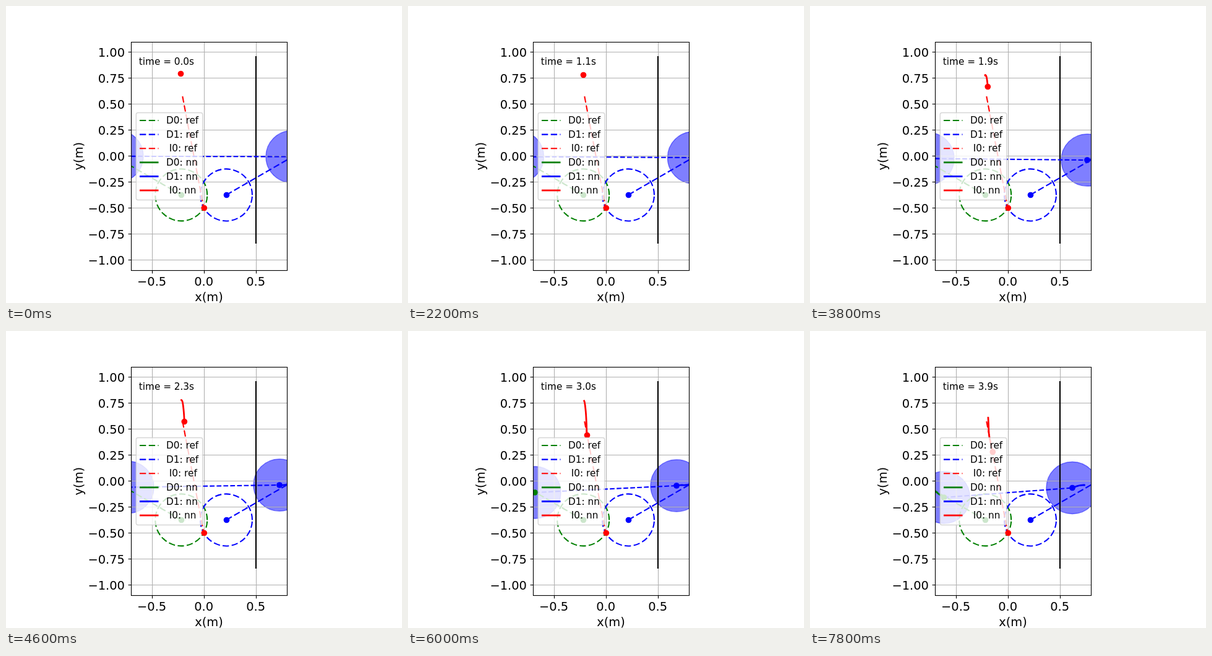
Animation, 640 px wide and 480 px high, one loop 8000 ms. Source, as an HTML page:

```html
<!DOCTYPE html>
<html lang="en">
<head>
<meta charset="utf-8">
<title>Trajectories</title>
<style>
  html, body { margin: 0; width: 100%; height: 100%; overflow: hidden; background: #fff; }
  svg { display: block; width: 640px; height: 480px; font-family: "DejaVu Sans", sans-serif; }
  text { white-space: pre; }
</style>
</head>
<body>
<svg id="stage" viewBox="0 0 640 480"></svg>
<script>
const LOOP = 8000, STEP = 200, TRAIL = 18;
const GREEN = '#008000', BLUE = '#0000ff', RED = '#ff0000';
const BOX = { x: 202.5, y: 58.5, w: 252, h: 369 };
const px = x => 319.6 + 168 * x;
const py = y => 242.4 - 168 * y;
const snap = v => Math.floor(v + 0.5) + 0.5;

// Key times in seconds and pixel positions of the three agents
const times = [0, 0.4, 1.1, 1.5, 1.9, 2.3, 3, 3.9];
const tracks = {
  d0: { x: [180, 177.5, 177.5, 183, 191, 197, 205, 216.5],
        y: [242.8, 242.6, 243.5, 244.3, 246.5, 252.5, 261, 269] },
  d1: { x: [462, 462, 461.5, 456, 448, 442, 434, 424],
        y: [243.5, 244, 245, 247.4, 249, 249, 250, 253.5] },
  i0: { x: [282.5, 283.2, 283.5, 285.5, 287.3, 288.3, 289.5, 295.3],
        y: [109.5, 112.5, 111.5, 115.5, 130.5, 146.5, 168.5, 195.5] }
};

const stage = document.getElementById('stage');

function add(parent, tag, attrs, text) {
  const node = document.createElementNS('http://www.w3.org/2000/svg', tag);
  set(node, attrs);
  if (text !== undefined) node.textContent = text;
  parent.appendChild(node);
  return node;
}

function set(node, attrs) {
  for (const key in attrs) node.setAttribute(key, attrs[key]);
}

const group = (attrs = {}) => add(stage, 'g', attrs);
const label = (parent, x, y, size, text, attrs = {}) =>
  add(parent, 'text', { x, y, 'font-size': size, ...attrs }, text);
const stroke = (parent, d, color, width, dash) =>
  add(parent, 'path', { d, fill: 'none', stroke: color, 'stroke-width': width,
    'stroke-linejoin': 'round', ...(dash && { 'stroke-dasharray': dash }) });
const dot = (parent, color, x = 0, y = 0) =>
  add(parent, 'circle', { cx: x, cy: y, r: 4.86, fill: color });
const disc = parent =>
  add(parent, 'circle', { r: 42, fill: BLUE, 'fill-opacity': 0.5,
    stroke: BLUE, 'stroke-opacity': 0.5, 'stroke-width': 1.39 });

const REF = '10.3 4.45', LINK = '7.7 3.33';

add(stage, 'rect', { width: 640, height: 480, fill: '#fff' });
const clip = add(add(stage, 'defs'), 'clipPath', { id: 'plot' });
add(clip, 'rect', { x: BOX.x, y: BOX.y, width: BOX.w, height: BOX.h });
const inside = { 'clip-path': 'url(#plot)' };

const patches = group(inside);
const disc0 = disc(patches), disc1 = disc(patches);

// Grid, ticks and tick labels
const axes = group();
const tickText = v => v.toFixed(Math.abs(v * 4) % 1 ? 1 : 2).replace('-', '\u2212');
const right = BOX.x + BOX.w, bottom = BOX.y + BOX.h;
for (const v of [-0.5, 0, 0.5]) {
  const x = snap(px(v));
  stroke(axes, `M${x} ${BOX.y}V${bottom}`, '#b0b0b0', 1.11);
  stroke(axes, `M${x} ${bottom}v4.86`, '#000', 1.11);
  label(axes, px(v), 451.6, 19.44, v.toFixed(1).replace('-', '\u2212'), { 'text-anchor': 'middle' });
}
for (let k = -4; k <= 4; k++) {
  const y = snap(py(k / 4));
  stroke(axes, `M${BOX.x} ${y}H${right}`, '#b0b0b0', 1.11);
  stroke(axes, `M${BOX.x} ${y}h-4.86`, '#000', 1.11);
  label(axes, 192, y + 7.1, 19.44, tickText(k / 4), { 'text-anchor': 'end' });
}
label(axes, 328, 476.6, 19.44, 'x(m)', { 'text-anchor': 'middle' });
label(axes, 0, 0, 19.44, 'y(m)', { 'text-anchor': 'middle', transform: 'translate(124 242.6) rotate(-90)' });

// Reference paths, wall and moving lines
const plot = group(inside);
const cx = 0.25 * Math.cos(Math.PI / 6), cy = py(-0.375);
const ring = (x, color) =>
  stroke(plot, `M${x + 42} ${cy}a42 42 0 1 0 -84 0a42 42 0 1 0 84 0`, color, 2.08, REF);
const left0 = px(-cx), left1 = px(cx);
stroke(plot, 'M404 81V384', '#000', 2.08);
ring(left0, GREEN);
ring(left1, BLUE);
stroke(plot, `M${left0} ${cy}l-120 -69.3`, GREEN, 2.08, REF);
stroke(plot, `M${left1} ${cy}l120 -69.3`, BLUE, 2.08, REF);
stroke(plot, `M285.3 146L${px(0)} ${py(-0.5)}`, RED, 2.08, REF);
dot(plot, GREEN, 283.5, 305.5);
dot(plot, BLUE, 356.5, 305.5);
dot(plot, RED, 320.3, 326.5);

const link = stroke(plot, '', BLUE, 2.08, LINK);
const agents = [['d0', GREEN], ['d1', BLUE], ['i0', RED]].map(([name, color]) => ({
  track: tracks[name],
  trail: stroke(plot, '', color, 2.78),
  head: dot(plot, color)
}));

add(stage, 'rect', { ...{ x: BOX.x, y: BOX.y, width: BOX.w, height: BOX.h },
  fill: 'none', stroke: '#000', 'stroke-width': 1.11 });
const clock = label(stage, 214.8, 94.6, 15.28, '');

// Legend
const legend = group();
add(legend, 'rect', { x: 210.3, y: 172.5, width: 107.5, height: 141, rx: 3,
  fill: '#fff', 'fill-opacity': 0.8, stroke: '#ccc', 'stroke-opacity': 0.8, 'stroke-width': 1.39 });
['D0: ref', 'D1: ref', ' I0: ref', 'D0: nn', 'D1: nn', ' I0: nn'].forEach((text, i) => {
  const y = 185 + 22.6 * i, color = [GREEN, BLUE, RED][i % 3];
  stroke(legend, `M216 ${y}h30.5`, color, i < 3 ? 2.08 : 2.78, i < 3 ? REF : '');
  label(legend, 259, y + 5.2, 15.28, text, { style: 'white-space:pre' });
});

// Smooth curve through the keys
function curve(values, t) {
  const last = times.length - 1;
  let i = 0;
  while (i < last - 1 && t > times[i + 1]) i++;
  const slope = k => {
    const a = Math.max(k - 1, 0), b = Math.min(k + 1, last);
    return (values[b] - values[a]) / (times[b] - times[a]);
  };
  const h = times[i + 1] - times[i], s = (t - times[i]) / h, r = 1 - s;
  return values[i] * (1 + 2 * s) * r * r + values[i + 1] * s * s * (3 - 2 * s)
    + h * s * r * (slope(i) * r - slope(i + 1) * s);
}

const at = (track, step) => [curve(track.x, step / 10), curve(track.y, step / 10)];

function draw(ms) {
  const step = Math.floor((ms % LOOP) / STEP);
  const heads = agents.map(({ track, trail, head }) => {
    const points = [];
    for (let k = Math.max(0, step - TRAIL); k <= step; k++) points.push(at(track, k));
    const [x, y] = points[points.length - 1];
    set(trail, { d: 'M' + points.map(p => p.map(v => v.toFixed(2)).join(' ')).join('L') });
    set(head, { cx: x, cy: y });
    return [x, y];
  });
  const [a, b] = heads;
  set(disc0, { cx: a[0], cy: a[1] });
  set(disc1, { cx: b[0], cy: b[1] });
  set(link, { d: `M${a}L${b}` });
  clock.textContent = `time = ${(step / 10).toFixed(1)}s`;
}

const start = performance.now();
function tick() {
  draw(performance.now() - start);
  requestAnimationFrame(tick);
}
draw(0);
requestAnimationFrame(tick);
</script>
</body>
</html>
```
